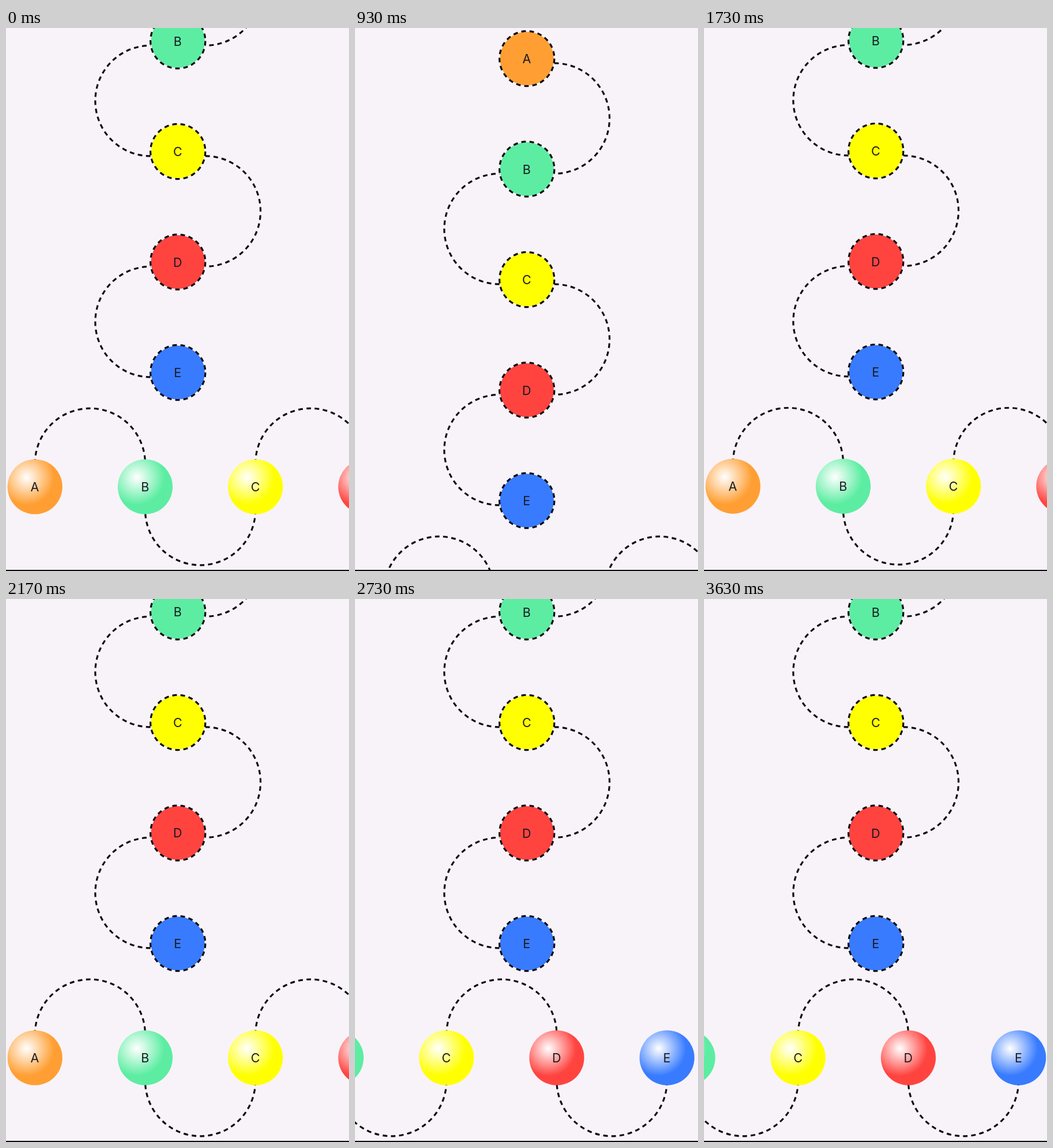
Write an HTML page that moves like this. It is 595x941 px and loops after 3.66 s.

```html
<!DOCTYPE html>
<html lang="en">
<head>
<meta charset="utf-8">
<style>
  html, body { margin: 0; width: 100%; height: 100%; overflow: hidden; background: #f8f3f9; }
  svg { display: block; }
  text { font: 21.5px Inter, Roboto, sans-serif; text-anchor: middle; fill: #1b1a20; }
  .dash { fill: none; stroke: #0c0a10; stroke-width: 3.2; stroke-dasharray: 7.93 6.35; }
</style>
</head>
<body>
<svg width="595" height="941" viewBox="0 0 595 941">
  <defs id="defs"></defs>
  <g id="page">
    <g id="column"></g>
    <g id="row"></g>
  </g>
  <rect y="939" width="595" height="2" fill="#0c0a10"/>
</svg>
<script>
const LOOP = 3660;
const R = 47.6;
const COLORS = ['#ff9f33', '#5ceda2', '#ffff00', '#ff4440', '#387bff'];
const el = id => document.getElementById(id);

const label = (i, x, y) => `<text x="${x}" y="${y + 8}">${'ABCDE'[i]}</text>`;
const disc = (x, y, r, fill) => `<circle cx="${x}" cy="${y}" r="${r}" fill="${fill}"/>`;
const ring = (x, y) => `<circle class="dash" cx="${x}" cy="${y}" r="${R}"/>`;
// Clockwise half circle: the small radius is scaled up to fit the chord
const arc = (x1, y1, x2, y2) => `<path class="dash" d="M${x1} ${y1}A1 1 0 0 1 ${x2} ${y2}"/>`;

function buildColumn() {
  const x = 298.2, top = -169, pitch = 191.5;
  let discs = '', arcs = '';
  COLORS.forEach((color, i) => {
    const y = top + i * pitch, join = y + 7.9;
    discs += disc(x, y, R - 1, color) + ring(x, y) + label(i, x - .4, y);
    if (i < 4) {
      arcs += i % 2 ? arc(x - R, join + pitch, x - R, join) : arc(x + R, join, x + R, join + pitch);
    }
  });
  el('column').innerHTML = arcs + discs;
}

function buildRow() {
  const left = 50.2, y = 795, pitch = 191.25, join = 40.2;
  let discs = '', arcs = '', defs = '';
  COLORS.forEach((color, i) => {
    const x = left + i * pitch;
    defs += `<radialGradient id="ball${i}" gradientUnits="userSpaceOnUse" cx="${x - 14.3}" cy="${y - 16}" r="${R}">
      <stop stop-color="#fff"/><stop offset="1" stop-color="${color}"/></radialGradient>`;
    discs += disc(x, y, R, `url(#ball${i})`) + label(i, x - .2, y);
    if (i < 4) {
      arcs += i % 2 ? arc(x + pitch, y + join, x, y + join) : arc(x, y - join, x + pitch, y - join);
    }
  });
  el('defs').innerHTML = defs;
  el('row').innerHTML = arcs + discs;
}

// A flick from one scroll edge to the other, then a damped bounce past it
function flick(t, start, hit, from, to) {
  if (t <= start) return from;
  if (t < hit) return from + (to - from) * ((t - start) / (hit - start)) ** 2;
  const s = t - hit;
  return to + Math.sign(to - from) * s * Math.exp(-.012 * s);
}

function draw(now) {
  const t = now % LOOP;
  const y = t < 1040 ? flick(t, 375.5, 538.5, 0, 218.5) : flick(t, 1040, 1200, 218.5, 0);
  const x = flick(t, 2200, 2365, 0, -269.5);
  el('page').setAttribute('transform', `translate(0 ${y.toFixed(2)})`);
  el('row').setAttribute('transform', `translate(${x.toFixed(2)} 0)`);
  requestAnimationFrame(draw);
}

buildColumn();
buildRow();
draw(0);
</script>
</body>
</html>
```
